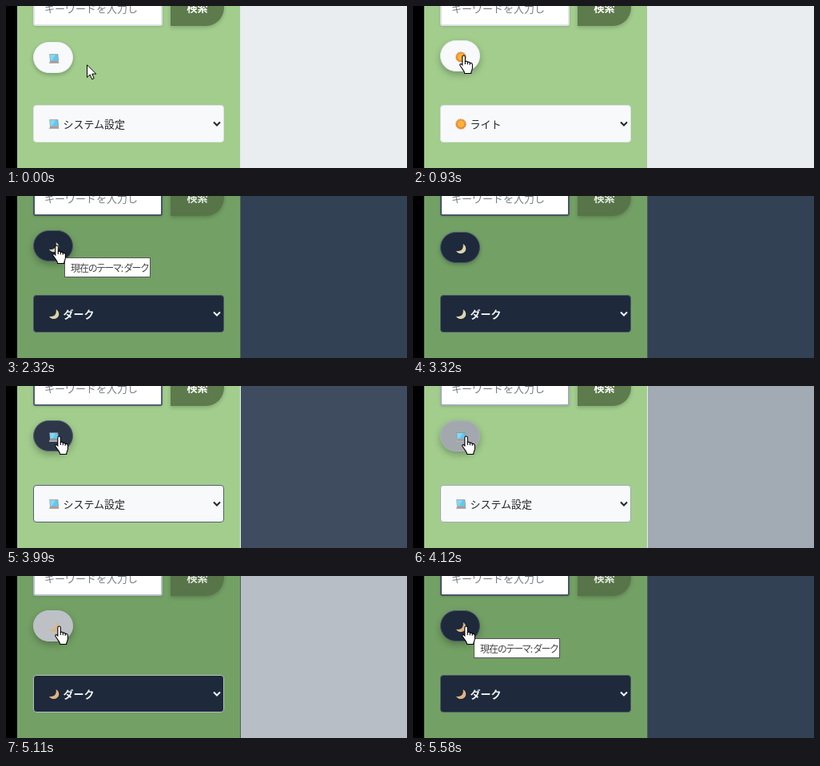
Recreate the animation shown at these times as an HTML page. Size 502 by 203 pixels, loop 8110 ms.

```html
<!DOCTYPE html>
<html lang="ja">
<head>
<meta charset="utf-8">
<title>テーマ切り替え</title>
<style>
/* --fade: eased theme mix, --snap: immediate theme mix, --lift: button hover */
@property --fade { syntax: '<percentage>'; inherits: true; initial-value: 0%; }
@property --snap { syntax: '<percentage>'; inherits: true; initial-value: 0%; }
@property --lift { syntax: '<number>'; inherits: true; initial-value: 0; }

html, body { margin: 0; width: 100%; height: 100%; overflow: hidden; }
body {
  position: relative;
  font: 13px/1.4 "Noto Sans CJK JP", "Noto Sans CJK", "Noto Sans", sans-serif;
  --loop: 8110ms;
  animation: fade var(--loop) linear infinite, snap var(--loop) step-end infinite,
    lift var(--loop) linear infinite;
}
body * { position: absolute; box-sizing: border-box; white-space: nowrap; }
.main {
  inset: 0;
  background: color-mix(in srgb, #e9edf0, #334155 var(--fade));
}
.edge { left: 0; top: 0; width: 14px; height: 100%; background: #000; }
.side {
  left: 14px; top: 0; width: 280px; height: 100%;
  background: color-mix(in srgb, #a2cd8d, #73a065 var(--snap));
  background-clip: padding-box;
  border-right: 1px solid color-mix(in srgb, #e6eaed, #4b6055 var(--snap));
}
.query {
  left: 34px; top: -21px; width: 162px; height: 46px;
  padding-left: 12px; line-height: 44px;
  color: #757d84; background: #fff;
  border: 2px solid color-mix(in srgb, #dee2e6, #475569 var(--fade));
  border-radius: 3px;
  box-shadow: 0 1px 3px #0002;
  overflow: hidden;
}
.search {
  left: 206px; top: -21px; width: 67px; height: 46px;
  border-radius: 0 23px 23px 0;
  background: color-mix(in srgb, #5d7b4c, #58754a var(--snap));
  color: color-mix(in srgb, #fff, #e6ebe2 var(--snap));
  font-size: 13.33px; font-weight: 700; line-height: 46px; text-align: center;
  box-shadow: 0 2px 5px #0003;
}
.toggle {
  left: 34px; top: 45px; width: 50px; height: 39px;
  border-radius: 20px;
  background: color-mix(in srgb, #f8f9fa, #1e293b var(--fade));
  border: 1px solid color-mix(in srgb, #eceff1, #475569 var(--fade));
  transform: translateY(calc(var(--lift) * -2px));
  box-shadow: 0 calc(2px + var(--lift) * 2px) calc(5px + var(--lift) * 3px) #0004;
}
.toggle svg { left: 17.5px; top: 12.5px; }
.select {
  left: 34px; top: 124px; width: 239px; height: 47px;
  border-radius: 4px;
  background: color-mix(in srgb, #f8f9fb, #1e293b var(--snap));
  border: 1px solid color-mix(in srgb, #dee2e6, #475569 var(--fade));
  color: color-mix(in srgb, #212529, #f1f5f9 var(--snap));
  line-height: 45px;
}
.select svg { left: 17.5px; top: 16px; }
.select span { left: 36.5px; top: 0; }
.select .chevron { left: 224px; top: 19px; }
svg { display: block; overflow: visible; }
.icon { width: 14px; height: 14px; }

.sys { animation: sys var(--loop) step-end infinite; }
.sun { animation: sun var(--loop) step-end infinite; }
.moon { animation: snapOpacity var(--loop) step-end infinite, moonFill var(--loop) step-end infinite; }
span.moon { font-weight: 700; }

.tip {
  left: 73px; top: 77px; width: 108px; height: 25px;
  padding-left: 7px;
  font-size: 12px; line-height: 23px; letter-spacing: -1.05px;
  font-feature-settings: "palt";
  color: #444; background: #fff; border: 1px solid #555;
}
.tip.light { width: 107px; animation: tipLight var(--loop) step-end infinite; }
.tip.dark { animation: tipDark var(--loop) step-end infinite; }

.cursor { left: 0; top: 0; width: 0; height: 0; animation: travel var(--loop) ease-in-out infinite; }
.arrow { left: 0; top: 0; animation: arrow var(--loop) step-end infinite; }
.hand { left: -5px; top: -1px; animation: hand var(--loop) step-end infinite; }

@keyframes fade {
  0%, 100% { --fade: 0%; }
  21.887% { --fade: 0%; animation-timing-function: ease; }
  25.092%, 49.014% { --fade: 100%; }
  49.014% { animation-timing-function: ease; }
  51.973%, 62.084% { --fade: 0%; }
  62.084% { animation-timing-function: ease; }
  65.536%, 99.999% { --fade: 100%; }
}
@keyframes snap {
  0%, 49.014% { --snap: 0%; }
  21.887%, 62.084%, 100% { --snap: 100%; }
}
@keyframes lift {
  0%, 7.645% { --lift: 0; }
  9.6%, 30.826% { --lift: 1; }
  32.8%, 46.116% { --lift: 0; }
  48.1%, 100% { --lift: 1; }
}
@keyframes sys {
  0%, 49.014% { opacity: 1; }
  10.604%, 56.597%, 100% { opacity: 0; }
}
@keyframes sun {
  0%, 21.887%, 62.084%, 100% { opacity: 0; }
  10.604%, 56.597% { opacity: 1; }
}
@keyframes snapOpacity {
  0%, 49.014% { opacity: 0; }
  21.887%, 62.084%, 100% { opacity: 1; }
}
@keyframes moonFill {
  0% { fill: #dcd3ab; }
  62.084%, 100% { fill: #e0b380; }
}
@keyframes tipLight {
  0%, 21.208%, 100% { opacity: 0; }
  18.002% { opacity: 1; }
}
@keyframes tipDark {
  0%, 29.47% { opacity: 0; transform: none; }
  28.607% { opacity: 1; transform: none; }
  68.804%, 100% { opacity: 1; transform: translate(3px, 1px); }
}
@keyframes travel {
  0%, 5.672% { transform: translate(101px, 73px); }
  10.111%, 29.47% { transform: translate(63px, 62px); }
  34.279% { transform: translate(102px, -11px); animation-timing-function: step-end; }
  40.937%, 43.403% { transform: translate(102px, -24px); }
  47.472%, 100% { transform: translate(66px, 63px); }
}
@keyframes arrow {
  0%, 30.826% { opacity: 1; }
  7.645%, 46.116%, 100% { opacity: 0; }
}
@keyframes hand {
  0%, 30.826% { opacity: 0; }
  7.645%, 46.116%, 100% { opacity: 1; }
}
</style>
</head>
<body>
<svg width="0" height="0">
  <symbol id="laptop" viewBox="0 0 14 14">
    <path d="M1.3 1.2H12.2L13 9.8H2Z" fill="#8b9299"/>
    <path d="M2 2H11.5L12.1 9H2.7Z" fill="#62c8ee"/>
    <path d="M2 2H9L5 9H2.7Z" fill="#86d7f3"/>
    <path d="M2 9.8H13L13.4 13H.8Z" fill="#b3b0ae"/>
    <path d="M2.5 11H12.5" stroke="#858789" stroke-width=".8"/>
  </symbol>
  <symbol id="sun" viewBox="0 0 14 14">
    <circle cx="7" cy="7" r="5.7" fill="none" stroke="#e2792c" stroke-width="1.8" stroke-dasharray="1.7 .54"/>
    <circle cx="7" cy="7" r="5.3" fill="#e98a2b"/>
    <circle cx="7" cy="6.8" r="4.3" fill="#f6b437"/>
  </symbol>
  <symbol id="moon" viewBox="0 0 14 14">
    <path d="M9.6 1C14 3.4 14.4 9.1 10.8 11.8 7.700 14.1 2.900 13.200 1 9.700 4.400 10.500 7.300 9.700 8.800 7.200 9.900 5.300 10.100 3.100 9.600 1Z"/>
  </symbol>
</svg>

<div class="main"></div>
<div class="edge"></div>
<div class="side"></div>
<div class="query">キーワードを入力し</div>
<div class="search">検索</div>

<div class="toggle">
  <svg class="icon sys"><use href="#laptop"/></svg>
  <svg class="icon sun"><use href="#sun"/></svg>
  <svg class="icon moon"><use href="#moon"/></svg>
</div>

<div class="select">
  <svg class="icon sys"><use href="#laptop"/></svg>
  <svg class="icon sun"><use href="#sun"/></svg>
  <svg class="icon moon"><use href="#moon"/></svg>
  <span class="sys">システム設定</span>
  <span class="sun">ライト</span>
  <span class="moon">ダーク</span>
  <svg class="chevron" width="10" height="8" fill="none" stroke="currentColor" stroke-width="2">
    <path d="M1 1.500 5 5.500 9 1.500"/>
  </svg>
</div>

<div class="tip light">現在のテーマ: ライト</div>
<div class="tip dark">現在のテーマ: ダーク</div>

<div class="cursor">
  <svg class="arrow" width="13" height="20" fill="#fff" stroke="#000">
    <path d="M.5.8V16.500L4.200 13 6.600 18.800 9.200 17.700 6.800 12.100H11.800Z"/>
  </svg>
  <svg class="hand" width="18" height="25" fill="#fff" stroke="#000" stroke-width="1.100">
    <path d="M5.500 1C6.700 1 7.300 1.800 7.300 2.800V8.400C8.500 7.800 10 8.200 10.300 9.400 11.400 8.800 12.900 9.300 13.200 10.500 14.600 10 16.400 10.800 16.400 12.400V16.500C16.400 19 14.700 20.500 14.700 23.500H6.700C6.500 21 4.500 19 3.300 17L.9 13.600C.2 12 1.800 11 3 12L3.800 13V2.800C3.800 1.800 4.400 1 5.500 1Z"/>
    <path d="M7.300 8.400V12M10.300 9.400V12.300M13.200 10.500V12.800" fill="none"/>
  </svg>
</div>
</body>
</html>
```
